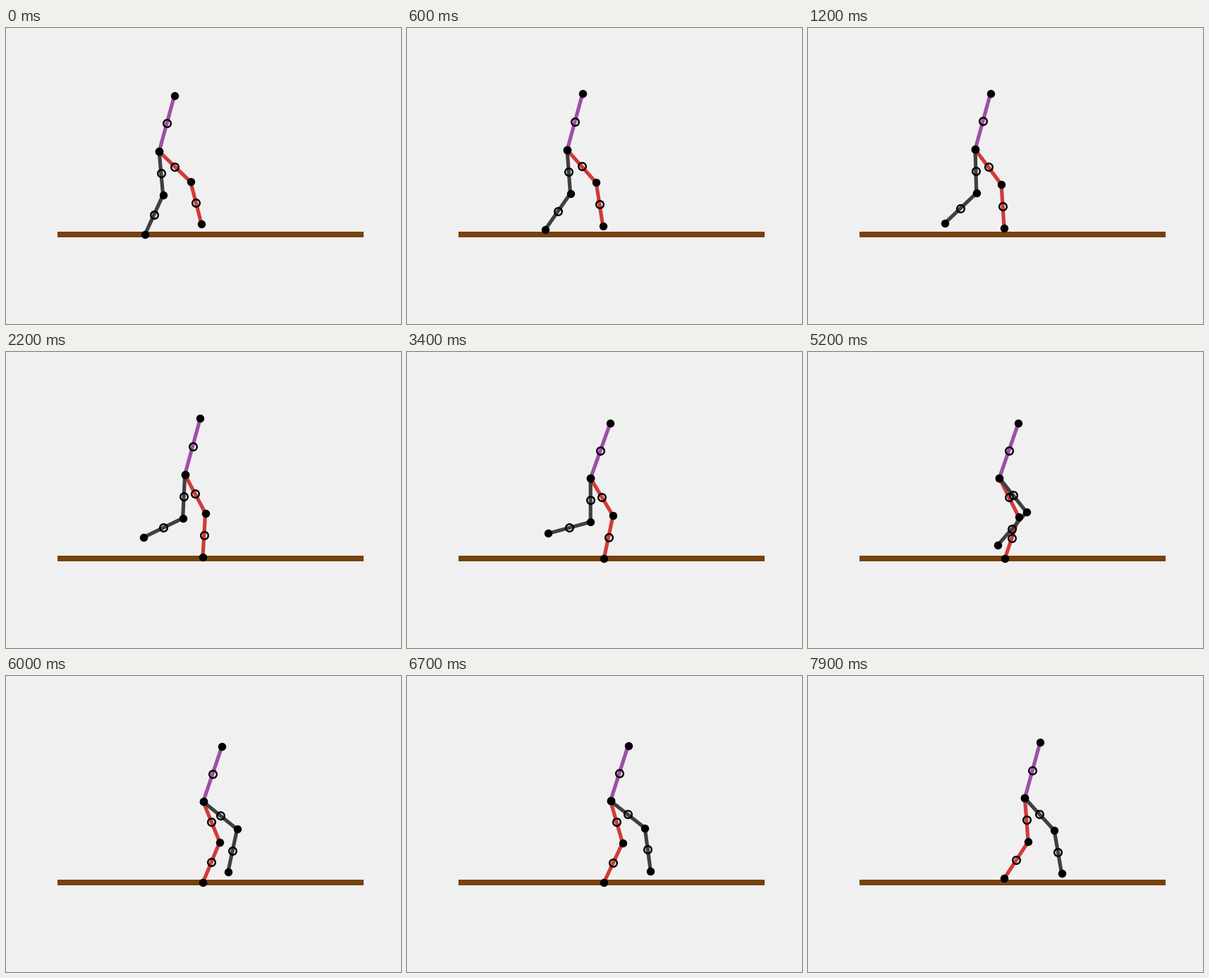
A matplotlib script for the animation above (8 s loop, 560 px wide and 420 px high).

```python
import numpy as np
import matplotlib.pyplot as plt
from matplotlib.animation import FuncAnimation

W, H, DPI = 560, 420, 100
FRAMES, STEP = 80, 100
PX = 72 / DPI                  # points per pixel
GROUND = 293
TORSO, LINK = 82.6, 62.0
PERIOD, STRIDE = 7.4, 82       # one step: seconds, pixels
LAND = 2.5                     # flight before this time, support after it


def ease(t, t0, t1, a, b):
    f = np.clip((t - t0) / (t1 - t0), 0, 1)
    return a + (b - a) * (1 - np.cos(np.pi * f)) / 2


def polar(deg, r):
    """Vector of length r, at an angle from straight down."""
    a = np.radians(deg)
    return r * np.array([np.sin(a), np.cos(a)])


def squat(u):
    """How far the hip sinks on the supporting leg."""
    x = np.pi * max(u - LAND, 0) / (PERIOD - LAND)
    return 4.6 * np.sin(x) + 0.8 * np.sin(2 * x) + 0.8 * np.sin(3 * x)


def hip_at(u):
    """Ballistic flight, then a steady push from the ground."""
    f, s = min(u, LAND), max(u - LAND, 0)
    x = 217.1 + 16.6 * f + 0.32 * s + 1.62 * s**2
    y = 175.2 - 4.6 * f + 1.83 * f**2 + squat(u)
    return np.array([x, y])


def lead_leg(u, hip):
    """Foot drops to the ground and stays; the knee bends forward."""
    f = min(u, LAND)
    foot = np.array([277.2 + 0.8 * f,
                     GROUND - 3.5 * (LAND - f) - 0.95 * (LAND**2 - f**2)])
    d = foot - hip
    r = np.hypot(*d)
    bend = np.sqrt(max(LINK**2 - r * r / 4, 0))
    knee = (hip + foot) / 2 + bend * np.array([d[1], -d[0]]) / r
    return np.array([hip, knee, foot])


def trail_leg(u, hip):
    """Kick back, then swing through to the front."""
    if u < 2.8:
        thigh = ease(u, 0, 2.8, 5.1, -3.7)
    elif u < 6.4:
        thigh = ease(u, 2.8, 6.4, -3.7, 52.5)
    else:
        thigh = ease(u, 6.4, 9.2, 52.5, 27)
    if u < 3.6:
        shank = ease(u, -1.5, 3.6, -12, -75)
    else:
        shank = ease(u, 3.6, PERIOD, -75, 14.9)
    knee = hip + polar(thigh, LINK)
    return np.array([hip, knee, knee + polar(shank, LINK)])


def pose(t):
    """Torso, red leg and dark leg; the legs swap roles every step."""
    n, u = divmod(t, PERIOD)
    hip = hip_at(u)
    head = hip - polar(-15.3 - 1.08 * squat(u), TORSO)
    legs = [lead_leg(u, hip), trail_leg(u, hip)]
    if n % 2:
        legs.reverse()
    return [p + [n * STRIDE, 0] for p in (np.array([hip, head]), *legs)]


fig = plt.figure(figsize=(W / DPI, H / DPI), dpi=DPI, facecolor="#f0f0f0")
ax = fig.add_axes([0, 0, 1, 1])
ax.set(xlim=(0, W), ylim=(H, 0))
ax.axis("off")

ax.plot([73, 507], [GROUND, GROUND], color="#77420f", lw=8 * PX,
        solid_capstyle="butt", snap=False)
limbs = [ax.plot([], [], color=c, lw=5.2 * PX, solid_capstyle="butt",
                 solid_joinstyle="round")[0]
         for c in ("#9e4fa8", "#d13a38", "#404040")]
joints, = ax.plot([], [], "o", color="black", ms=11.4 * PX, mew=0)
centers, = ax.plot([], [], "o", mfc="none", mec="black", ms=10.6 * PX,
                   mew=2.4 * PX)


def update(i):
    parts = pose(i * STEP / 1000)
    for line, p in zip(limbs, parts):
        line.set_data(p[:, 0], p[:, 1])
    joints.set_data(*np.vstack(parts).T)
    centers.set_data(*np.vstack([(p[1:] + p[:-1]) / 2 for p in parts]).T)
    return [*limbs, joints, centers]


anim = FuncAnimation(fig, update, frames=FRAMES, interval=STEP, repeat=True,
                     repeat_delay=0)
plt.show()
```
